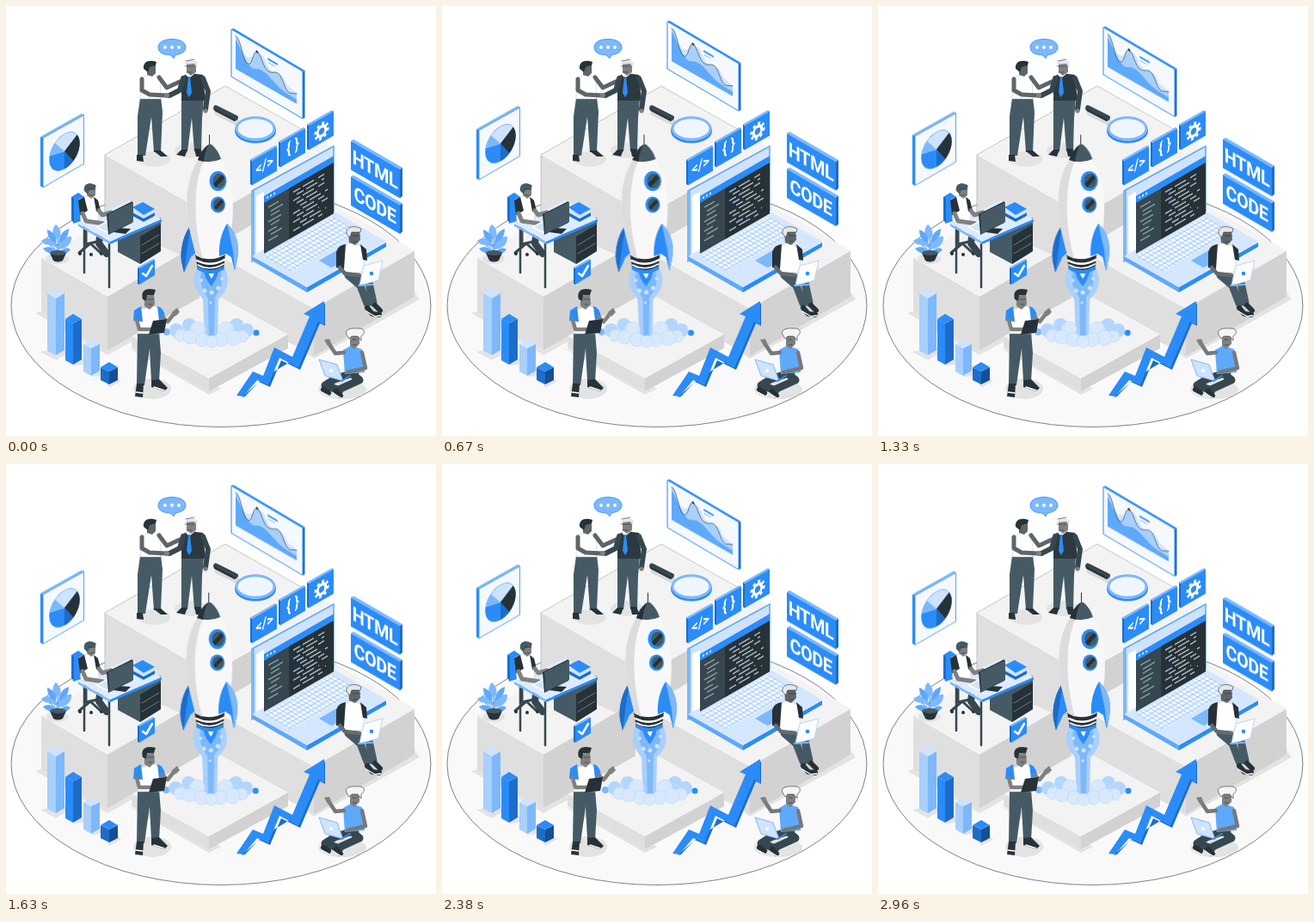
Animation of 500 by 500 pixels, one loop 3 s. Source, as an HTML page without scripts:

```html
<!DOCTYPE html>
<html lang="en">
<head>
<meta charset="utf-8">
<title>Project launch</title>
<style>
html, body { margin: 0; width: 100%; height: 100%; overflow: hidden; background: #fff; }
svg { display: block; width: 100%; height: 100%; }
.b { fill: #2b8cf7; } .n { fill: #1d6cc8; } .l { fill: #7db8fb; } .m { fill: #a9cffb; } .p { fill: #cfe3fd; }
.d { fill: #263238; } .g { fill: #455a64; } .s { fill: #808080; } .k { fill: #5f6468; }
.w { fill: #fff; }
.top { fill: #f3f3f3; } .left { fill: #dfdfdf; } .right { fill: #d2d2d2; } .shade { fill: #e3e3e3; }
.edge { stroke: #263238; stroke-width: .6; }
.line { fill: none; stroke-linecap: round; stroke-linejoin: round; }
text { fill: #fff; font-family: Roboto, Arial, sans-serif; font-weight: 700; text-anchor: middle; }
.float { animation: float 1.5s linear infinite; }
.rocket { animation: shake 1.5s cubic-bezier(.36,.07,.19,.97) infinite; }
@keyframes float { 50% { transform: translateY(-10px); } }
@keyframes shake {
  10%, 90% { transform: translateX(-.8px); }
  20%, 80% { transform: translateX(1.5px); }
  30%, 50%, 70% { transform: translateX(-3px); }
  40%, 60% { transform: translateX(3px); }
}
</style>
</head>
<body>
<svg viewBox="0 0 500 500">
<defs>
  <pattern id="keys" width="5" height="6" patternUnits="userSpaceOnUse">
    <rect width="4" height="4.700" rx=".6" fill="#f4f9ff"/>
  </pattern>
  <g id="tile">
    <path class="n" d="M0 0L-2-1.500V27L0 28.500Z"/>
    <path class="l" d="M0 0L-2-1.500L27-18L29-16.700Z"/>
    <path class="b" d="M0 0L29-16.700V11.800L0 28.500Z"/>
  </g>
  <g id="sign">
    <path class="l" d="M0 0L3-2L60 31L57 33Z"/>
    <path class="n" d="M57 33L60 31V64L57 66.500Z"/>
    <path class="b" d="M0 0L57 33V66.500L0 33.500Z"/>
  </g>
</defs>

<ellipse cx="250" cy="348.500" rx="244" ry="141" fill="#f9f9f9" class="edge"/>

<!-- blocks -->
<path class="shade" d="M34 357L118 406L165 380L140 330ZM350 404L358 410L481 341L470 325ZM140 397L236 452L250 445Z"/>
<path class="top" d="M115 173L255 93L378 164L238 244Z"/>
<path class="left" d="M115 173L238 244V330L115 259Z"/>
<path class="right" d="M238 244L378 164V250L238 330Z"/>
<path class="line" stroke="#8b9194" stroke-width=".5" d="M115 259V173L255 93L352 148"/>
<path class="top" d="M41 293L115 250L215 295V298L118 338Z"/>
<path class="left" d="M41 293L118 338V400L41 355Z"/>
<path class="right" d="M118 338L225 276V340L118 400Z"/>
<path class="top" d="M235 284L352 216L475 284V286L358 352Z"/>
<path class="left" d="M235 284L358 352V407L235 340Z"/>
<path class="right" d="M358 352L475 285V338L358 407Z"/>
<path class="top" d="M146 384L238 332L328 382L236 433Z"/>
<path class="left" d="M146 384L236 433V448L146 398Z"/>
<path class="right" d="M236 433L328 382V398L236 448Z"/>

<!-- chart board -->
<g class="float">
  <path class="n" d="M345 76L347.500 75V130L345 131Z"/>
  <path class="b" d="M262 27L264.500 26L347.500 75L345 76Z"/>
  <path d="M262 27L345 76V131L262 82Z" fill="#f5f8fc" stroke="#2b8cf7"/>
  <g transform="matrix(1 .577 0 1 262 27)">
    <path class="p" d="M5 43V14C12 12 15 26 22 20S34 2 41 16S58 10 65 28L76 31V43Z"/>
    <path class="m" d="M5 43V5C11 3 13 29 19 29S25 9 30 9S37 24 43 24S50 19 55 20S62 36 68 35L76 31V43Z"/>
    <path fill="#5fa9fa" d="M5 43V9C11 14 18 36 28 30S43 29 50 33S63 38 76 38V43Z"/>
    <path class="line" stroke="#37474f" stroke-width=".6" d="M5 5C11 3 13 29 19 29S25 9 30 9S37 24 43 24S50 19 55 20S62 36 68 35L76 31"/>
    <path class="line" stroke="#2b8cf7" stroke-width="2" d="M43 10H53"/>
    <path class="line" stroke="#7db8fb" d="M43 14H50"/>
    <circle cx="30" cy="9" r="1.400" class="d"/>
  </g>
</g>

<!-- pie board -->
<g class="float">
  <path class="b" d="M40 152L43 153V211L40 209.500Z"/>
  <path class="l" d="M40 152L88 125L91 126.500L43 153.500Z"/>
  <path d="M43 153.500L90.500 127V183.500L43 211Z" fill="#f5f8fc" stroke="#2b8cf7" stroke-width=".8"/>
  <g transform="matrix(.866 -.48 0 1 68 169)">
    <circle r="20.500" class="b"/>
    <path class="p" d="M0 0L-20-4A20.500 20.500 0 0 1 17-11Z"/>
    <path class="l" d="M0 0L-20-4A20.500 20.500 0 0 1-13-16Z"/>
    <path class="d" d="M0 0L17-11A20.500 20.500 0 0 1 12 17Z"/>
    <path class="n" d="M0 0L12 17A20.500 20.500 0 0 1 0 20.500Z"/>
  </g>
</g>

<!-- speech bubble -->
<path d="M191 57L195 61L197 57C204 56 209 53 209 48C209 42 202 38.500 193 38.500S177 42 177 48S183 57 191 57Z" class="l" stroke="#2b8cf7" stroke-width=".8"/>
<g class="w"><circle cx="185" cy="48" r="1.900"/><circle cx="193" cy="48" r="1.900"/><circle cx="201" cy="48" r="1.900"/></g>

<!-- magnifier -->
<path class="line" stroke="#d9d9d9" stroke-width="7" d="M246 124L268 135"/>
<path class="line" stroke="#37474f" stroke-width="6" d="M244 118.500L267 130"/>
<path class="line" stroke="#263238" stroke-width="2" d="M243 121L266 133"/>
<ellipse cx="290" cy="145" rx="22.500" ry="13" fill="none" stroke="#2b8cf7" stroke-width="3"/>
<ellipse cx="290" cy="142.500" rx="22" ry="12.800" fill="#f0f6fe" stroke="#7db8fb" stroke-width="3"/>

<!-- handshake -->
<ellipse cx="172" cy="178" rx="19" ry="9" class="shade"/><ellipse cx="215" cy="168" rx="19" ry="9" class="shade"/>
<g>
  <path class="g" d="M156 107L180 106L182 123L180 170H172L169 129L162 174H153L153 128Z"/>
  <path class="d" d="M152 173L159 173L160 181L152 180ZM171 168L180 168L188 175L180 175Z"/>
  <path class="w" d="M157 83L171 79L179 83L180 108H156Z" stroke="#b8bec2" stroke-width=".5"/>
  <path class="line" stroke="#5f6468" stroke-width="5" d="M158 85L158 98L167 103L186 104M178 83L187 95L202 88"/>
  <path class="k" d="M164 71L174 68L174 78L170 82L164 80Z"/>
  <path class="d" d="M160 73C159 65 166 62 175 65L174 69L167 71L165 77Z"/>
</g>
<g>
  <path class="g" d="M204 108L230 108L228 130L227 169H219L216 130L211 169H204L204 130Z"/>
  <path class="d" d="M204 167H211L208 175L198 173ZM219 166H226L230 175H221Z"/>
  <path fill="#2c3940" d="M204 82L213 78L229 80L232 110H204Z"/>
  <path class="line" stroke="#37474f" stroke-width="6" d="M229 84L235 99L232 120M206 84L202 98L190 104"/>
  <path class="w" d="M209 80L213 84L219 79L215 76Z"/><path class="b" d="M212 82L214 82L216 101L213 106L210 101Z"/>
  <circle cx="187" cy="104" r="3" class="s"/><circle cx="232" cy="122" r="2.500" class="s"/>
  <path class="s" d="M210 67L221 66L221 77L215 81L210 77Z"/>
  <path fill="#e6e6e6" d="M208 68C209 62 217 61 223 66L222 72L219 67Z"/>
  <path class="line edge" d="M208 70H219M210 77L216 77M209 64L219 62"/>
</g>

<!-- code tiles -->
<use href="#tile" x="286" y="180"/><use href="#tile" x="319" y="159"/><use href="#tile" x="352" y="139"/>
<text transform="matrix(.866 -.5 0 1 300.500 190.500)" font-size="17" y="0">&lt;/&gt;</text>
<text transform="matrix(.866 -.5 0 1 333.500 169.500)" font-size="19" y="0">{ }</text>
<g transform="matrix(.866 -.5 0 1 367 145.500)" fill="none" stroke="#fff">
  <circle r="5.500" stroke-width="3.500"/><circle r="8.500" stroke-width="3" stroke-dasharray="3.300 3.375"/>
</g>

<!-- laptop -->
<path d="M286 215L381 163V243L286 297Z" class="p" stroke="#5fa9fa" stroke-width="1.500"/>
<path class="l" d="M286 215L289 213.500V296L286 297Z"/>
<path class="w" d="M291 221L300 216V285L291 290Z"/>
<path fill="#5fa9fa" d="M286 296L350 333V327L286 290Z"/>
<path class="b" d="M350 333L442 280V275L350 327Z"/>
<path d="M286 291L380 238L442 274L350 327Z" fill="#d5e7fe"/>
<g transform="matrix(.866 -.5 .866 .5 286 291)">
  <rect x="8" y="8" width="92" height="36" class="m"/>
  <rect x="8" y="8" width="92" height="36" fill="url(#keys)"/>
  <rect x="40" y="50" width="32" height="17" class="l"/>
</g>
<g transform="matrix(1 -.577 0 1 300 224)">
  <rect width="81" height="64" fill="#37474f"/>
  <rect y="-3" width="81" height="8" class="b"/>
  <g class="w"><circle cx="4" cy="1" r="1.100"/><circle cx="8" cy="1" r="1.100"/><circle cx="12" cy="1" r="1.100"/></g>
  <rect x="29" y="5" width="52" height="59" class="d"/>
  <g fill="none" stroke-width="1.500">
    <path stroke="#b8c4ca" stroke-dasharray="8 3 13 5 7 9" d="M34 12H74M38 17H70M34 22H76M38 27H65M42 32H74M34 37H70M38 42H75M34 47H64M42 52H72M34 57H68"/>
    <path stroke="#7db8fb" d="M34 12H39M38 27H46M34 37H38M42 52H49"/>
    <path stroke="#90a4ae" d="M5 13H17M8 19H22M8 24H18M5 30H20M8 35H18M5 41H15M8 46H21M5 52H16"/>
  </g>
</g>

<!-- signs -->
<g class="float">
  <use href="#sign" x="401" y="157"/>
  <use href="#sign" x="401" y="198.500"/>
  <g font-size="23" letter-spacing="-.5">
    <text transform="matrix(.866 .5 0 1 429 198)">HTML</text>
    <text transform="matrix(.866 .5 0 1 429 239.500)">CODE</text>
  </g>
</g>

<!-- desk -->
<path class="b" d="M76 222L84 217L91 222V249L78 253Z"/><path class="n" d="M76 222L79 224V252L76 249Z"/>
<path class="line" stroke="#37474f" stroke-width="3" d="M93 255V275M85 287L98 276L111 288M93 277L106 274"/>
<g class="d"><circle cx="86" cy="288" r="2"/><circle cx="99" cy="289" r="2"/><circle cx="111" cy="288" r="2"/></g>
<path class="line" stroke="#37474f" stroke-width="8" d="M93 254L110 261L108 276L117 288"/>
<path class="g" d="M130 262L180 246V285L156 300L130 286Z"/>
<path class="d" d="M156 268L180 254V285L156 300Z"/>
<path class="line" stroke="#78909c" stroke-width=".8" d="M158 278L178 266M158 288L178 276"/>
<path class="line" stroke="#37474f" stroke-width="2.500" d="M91 257V310M120 276V327"/>
<path d="M84 253L143 226L181 248L121 274Z" fill="#dcebfe"/>
<path class="l" d="M84 253L121 274V277L84 256Z"/><path class="b" d="M121 274L181 248V251L121 277Z"/>
<path class="n" d="M147 240L160 247L173 240V244L160 251L147 244Z"/>
<path class="p" d="M148 236L160 243L173 236V240L160 247L148 240Z"/>
<path class="b" d="M147 234L159 228L173 236L160 243Z"/>
<path class="w" d="M85 225L96 220L106 225L108 249L87 252Z" stroke="#b8bec2" stroke-width=".5"/>
<path class="d" d="M84 226L91 222L95 238L86 243ZM102 222L107 226L110 238L105 239Z"/>
<path class="line" stroke="#808080" stroke-width="5" d="M89 241L93 250L113 253M108 238L112 243L122 240"/>
<path class="s" d="M95 212L104 209L104 220L99 224L94 220Z"/>
<path class="g" d="M91 215C89 206 99 204 105 209L103 213L97 214L95 219Z"/>
<path class="line edge" d="M96 213H104M96 220L102 220"/>
<path class="w" d="M104 257L117 250L130 257L117 264Z"/><path class="p" d="M107 257L117 252L127 257L117 262Z"/>
<path class="d" d="M130 258L145 259L139 265L125 263Z"/>
<path class="d" d="M117 242L147 227V252L119 266Z"/><path class="g" d="M119 242L148 228V251L120 265Z"/>

<!-- plant -->
<ellipse cx="60" cy="294" rx="13" ry="6" class="shade"/>
<path class="line" stroke="#2b8cf7" d="M60 289V264M60 285L47 275M60 284L72 272M60 280L51 264M60 279L69 262"/>
<g class="l">
  <path d="M60 272C51 265 55 257 58 254C65 260 65 267 60 272ZM60 283C53 275 44 280 41 273C50 265 58 274 60 283ZM60 283C60 274 68 267 76 268C77 278 68 283 60 283Z"/>
  <path fill="#5fa9fa" d="M58 276C49 272 48 265 48 260C56 263 60 269 58 276ZM61 275C62 266 67 261 73 259C73 268 68 274 61 275ZM58 286C52 290 45 285 43 282C50 278 56 281 58 286ZM62 286C68 280 72 281 75 283C71 289 66 289 62 286Z"/>
</g>
<path class="d" d="M51 287L70 287L66 296Q60 299 55 296Z"/><ellipse cx="60.500" cy="287" rx="9.500" ry="3" class="g"/>

<!-- rocket -->
<g class="rocket">
  <path d="M222 306C214 321 222 332 229 341L231 391H246L247 341C257 331 261 321 255 306Z" class="m"/>
  <path d="M228 307C223 320 229 330 235 340L236 388H242L243 338C251 329 253 319 249 307Z" class="l"/>
  <path class="b" d="M230 305L247 305C247 315 242 321 239 326C234 320 230 314 230 305Z"/>
  <path class="w" d="M234 304H243Q242 313 239 317Q235 312 234 304Z"/>
  <g class="p"><circle cx="227" cy="319" r="2"/><circle cx="231" cy="331" r="2.500"/><circle cx="247" cy="328" r="2.500"/><circle cx="251" cy="317" r="2"/><circle cx="239" cy="333" r="2.500"/><circle cx="238" cy="345" r="1.500"/></g>
  <g fill="#b5d6fc"><circle cx="187" cy="379" r="4" class="l"/><circle cx="198" cy="377" r="8"/><circle cx="213" cy="371" r="8"/><circle cx="268" cy="371" r="8"/><circle cx="280" cy="377" r="8"/><circle cx="291" cy="380" r="3.500" class="b"/></g>
  <g fill="#d9e9fd" stroke="#b5d6fc" stroke-width=".6">
    <circle cx="203" cy="383" r="7"/><circle cx="223" cy="376" r="9"/><circle cx="256" cy="376" r="9"/><circle cx="275" cy="384" r="7"/>
    <circle cx="214" cy="385" r="8"/><circle cx="264" cy="386" r="9"/><circle cx="228" cy="388" r="8"/><circle cx="250" cy="388" r="8"/><circle cx="239" cy="390" r="7"/>
  </g>
  <path class="b" d="M216 253C207 264 202 282 204 297L207 310L215 292L224 284Z"/>
  <path class="n" d="M216 253C207 264 202 282 204 297L207 310L212 272Z"/>
  <path class="d" d="M220 289Q238 299 255 288L253 306Q238 315 223 306Z"/>
  <path class="line" stroke="#fff" stroke-width="2.500" d="M222 296Q238 304 254 295"/>
  <path class="line" stroke="#2b8cf7" stroke-width="4" d="M224 305Q238 313 252 305"/>
  <path class="line" stroke="#fff" stroke-width="1.500" d="M223 301Q238 309 253 300"/>
  <path d="M224 178C211 197 207 226 213 258L221 290Q238 299 255 289C263 267 267 235 261 203L250 177Z" fill="#f8f8f8"/>
  <path d="M224 178C211 197 207 226 213 258L221 290L229 294C219 258 216 211 230 179Z" fill="#dcdcdc"/>
  <path class="b" d="M257 253C250 264 247 278 248 291L256 288L262 292L266 308L269 294C272 278 268 263 257 253Z"/>
  <path class="l" d="M257 253C268 263 272 278 269 294L266 308L264 285Z"/>
  <path class="line" stroke="#263238" stroke-width="1" d="M236.500 150V163"/>
  <path class="g" d="M223 179Q227 167 235.500 161L239 161Q247 168 250 178Q237 184 223 179Z"/>
  <path class="d" d="M223 179Q227 167 235.500 161Q231 170 230 181Z"/>
  <ellipse cx="246.500" cy="203.500" rx="10" ry="11.500" class="b"/><ellipse cx="247.500" cy="203.500" rx="7.300" ry="8.500" class="g"/><path class="d" d="M241 207L251 196L254 200L244 211Z"/>
  <ellipse cx="246.500" cy="231" rx="8.500" ry="9.500" class="b"/><ellipse cx="247.500" cy="231" rx="6.500" ry="7.300" class="g"/><path class="d" d="M242 234L250 225L253 228L244 237Z"/>
</g>

<!-- bars -->
<path class="shade" d="M40 402L58 412L68 406L80 418L90 417L100 431L112 430L120 444L134 436L68 397Z"/>
<path class="m" d="M48 334L58 340V406L48 401Z"/><path class="l" d="M58 340L68 334V400L58 406Z"/><path class="p" d="M48 334L58 328L68 334L58 340Z"/>
<path class="b" d="M69 364L78 369V417L69 412Z"/><path class="n" d="M78 369L88 364V411L78 417Z"/><path class="b" d="M69 364L78 358L88 364L78 369Z"/>
<path class="m" d="M90 393L99 398V430L90 425Z"/><path class="l" d="M99 398L109 393V424L99 430Z"/><path class="p" d="M90 393L99 387L109 393L99 398Z"/>
<path class="n" d="M110 420L120 425V440L110 435Z"/><path fill="#164f94" d="M120 425L130 420V435L120 440Z"/><path class="b" d="M110 420L120 414L130 420L120 425Z"/>

<!-- arrow -->
<path class="n" d="M274 455L278 454L294 437L307 443L320 412L342 423L365 369L371 372V345L340 408L300 432Z"/>
<path class="b" d="M268 453L287 425L299 430L312 397L333 408L353 361L346 358L370 343V371L363 367L340 421L318 409L305 441L292 435L276 454Z"/>

<!-- man with tablet -->
<ellipse cx="170" cy="445" rx="22" ry="12" class="shade"/>
<path class="g" d="M153 379H178L180 403L178 437H169L167 398L161 441H152Z"/>
<path class="d" d="M152 439H160L159 455L150 454ZM169 435L178 434L188 444L184 448L169 443Z"/>
<path class="line" stroke="#fff" stroke-width="1.500" d="M151 449L159 450M172 443L184 447"/>
<path class="w" d="M155 353L173 349L179 353L178 381H153Z" stroke="#b8bec2" stroke-width=".5"/>
<path class="b" d="M149 354L157 349L159 367L148 366ZM176 349Q184 351 185 362L178 366Z"/>
<path class="line" stroke="#808080" stroke-width="4.500" d="M152 365L155 376L170 376M182 362L188 367L196 357"/>
<path class="s" d="M193 356L199 351L202 356L197 361Z"/>
<path class="d" d="M171 366L187 364L184 380L166 382Z"/>
<path class="s" d="M161 337L172 335L173 347L167 353L161 349Z"/>
<path class="d" d="M159 341C156 330 164 327 174 330L172 336L164 336L163 343Z"/>
<path class="line edge" d="M165 341L172 341M166 347L170 347"/>
<path class="n" d="M153 304L155 305V324L153 323Z"/><path class="l" d="M153 304L171 294L173 295L155 305Z"/><path class="b" d="M155 305L173 295V313L155 324Z"/>
<path class="line" stroke="#fff" stroke-width="2.500" d="M159 311L163 314L170 302"/>

<!-- man on block -->
<path class="line" stroke="#455a64" stroke-width="9" d="M400 312L422 322L427 345M398 313L412 325L420 346"/>
<path class="line" stroke="#263238" stroke-width="6" d="M420 351L426 358L434 359M429 348L435 354"/>
<path class="line" stroke="#fff" stroke-width="1.300" d="M419 355L429 361L436 360"/>
<path class="w" d="M389 282L401 275L417 281L416 309L393 312Z" stroke="#b8bec2" stroke-width=".5"/>
<path class="d" d="M384 286Q386 278 395 277L393 306L384 304ZM412 277L419 283L420 296L415 295Z"/>
<path class="line" stroke="#666b70" stroke-width="4.500" d="M388 304L394 311L411 313"/>
<path class="k" d="M398 263L411 261L412 272L406 278L399 275Z"/>
<path d="M396 265C394 257 404 254 413 259L412 263L402 263L400 269Z" fill="#e6e6e6" class="edge"/>
<path class="line edge" d="M403 267H412M404 274H409"/>
<path d="M416 302L438 296L433 319L411 325Z" fill="#fdfdfd" stroke="#b5d6fc"/>
<circle cx="425" cy="311" r="2.300" class="b"/>
<path class="line" stroke="#7db8fb" stroke-width="2" d="M410 325L426 324"/>

<!-- seated woman -->
<ellipse cx="391" cy="446" rx="28" ry="11" class="shade"/>
<path class="line" stroke="#37474f" stroke-width="9" d="M406 426L382 434L371 441L388 447M404 429L411 435L387 446"/>
<path class="line" stroke="#263238" stroke-width="6" d="M369 446L375 450M384 448L389 453"/>
<path class="line" stroke="#fff" stroke-width="1.200" d="M367 449L375 453M383 452L390 456"/>
<path fill="#5fa9fa" d="M392 400L401 395L414 399L417 426L394 428Z"/>
<path class="line" stroke="#75797d" stroke-width="4.500" d="M414 403L418 421L397 426M393 403L383 404L375 392"/>
<path class="s" d="M370 388L376 387L379 394L374 395Z"/>
<path class="s" d="M400 383L411 381L411 393L405 399L400 395Z"/>
<path d="M396 382C393 376 402 374 409 375C418 374 418 381 413 384L413 389L409 384L402 384L399 387Z" fill="#f5f5f5" class="edge"/>
<path class="line edge" d="M403 388L407 388M403 394L407 394"/>
<path d="M364 411L385 417L392 436L371 430Z" fill="#cfe3fd" stroke="#7db8fb"/>
<circle cx="378" cy="424" r="2" class="w"/>
<path class="line" stroke="#2b8cf7" stroke-width="2" d="M390 436L400 430"/>
</svg>
</body>
</html>
```
